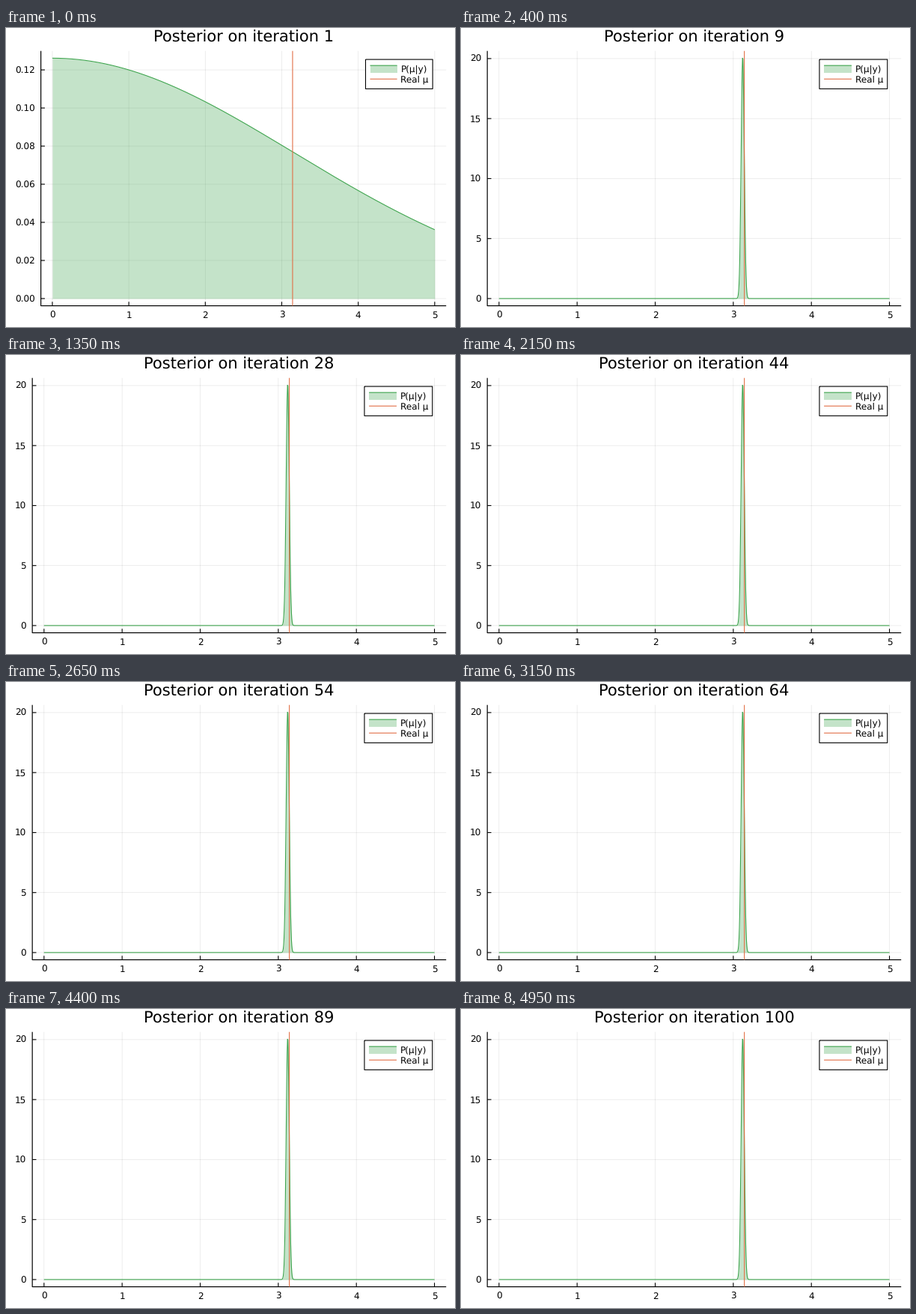
A matplotlib script for the animation above (5 s loop, 600 px wide and 400 px high).

```python
import math

import matplotlib.pyplot as plt
import numpy as np
from matplotlib.animation import FuncAnimation

W, H, DPI = 600, 400, 100
PX = 72 / DPI  # points per pixel
FRAMES, INTERVAL = 100, 50

GREEN, ORANGE = "#3da44d", "#e26f46"
TOP, BOTTOM, RIGHT = 30.7, 371.6, 588.2
PAD = 0.03 / 1.06  # axis margin on each side

REAL_MU = 3.1415
N, DATA_MEAN, DATA_VAR = 1000, 3.1205, 0.391
PRIOR_PRECISION = 0.1

plt.rcParams.update({"font.family": "DejaVu Sans", "text.hinting": "none"})


def posteriors(count):
    """Mean-field updates of the normal posterior over mu."""
    mean, var = 0.0, 1 / PRIOR_PRECISION
    result = []
    for _ in range(count):
        result.append((mean, var))
        tau = 1 / (DATA_VAR + (DATA_MEAN - mean) ** 2 + var)
        precision = PRIOR_PRECISION + N * tau
        mean, var = N * tau * DATA_MEAN / precision, 1 / precision
    return result


def tick_step(top):
    """Smallest 1-2-5 step that gives at most seven intervals."""
    base = 10 ** math.floor(math.log10(top / 7))
    return next(base * m for m in (1, 2, 5, 10) if top / (base * m) <= 7)


POSTERIORS = posteriors(FRAMES)
MU = np.linspace(0, 5, 1000)

fig = plt.figure(figsize=(W / DPI, H / DPI), dpi=DPI, facecolor="white")
ax = fig.add_axes([0, 0, 1, 1])


def line(x, y, color="black", width=1.1, z=2, **kw):
    ax.plot(x, y, color=color, lw=width * PX, zorder=z, snap=False,
            solid_capstyle="butt", **kw)


def text(x, y, label, size=12, ha="center", z=6):
    ax.text(x, y, label, fontsize=size * PX, ha=ha, va="baseline", zorder=z)


def fill(x, y0, y1, color, alpha=1.0, z=3):
    ax.fill_between(x, y0, y1, color=color, alpha=alpha, lw=0, zorder=z)


def draw_legend(width):
    unit = width / 45
    right = RIGHT - width / 30
    left = right - 4.5 * unit - 35.5
    top, row = TOP + (BOTTOM - TOP) / 30, 13.1
    bottom = top + 3 * row
    key = [left + unit / 2, left + 3.5 * unit]
    first, second = top + row, top + 2 * row

    fill([left, right], top, bottom, "white", z=5)
    line([left, right, right, left, left], [top, top, bottom, bottom, top], z=5.1)
    fill(key, first - 5, first + 5.1, GREEN, 0.3, z=5.2)
    line(key, [first - 5] * 2, GREEN, z=5.3)
    line(key, [second] * 2, ORANGE, z=5.3)
    label_x = left + 4 * unit - 1.2
    text(label_x, first + 4.4, "P(μ|y)", ha="left")
    text(label_x, second + 4.4, "Real μ", ha="left")


def draw(i):
    ax.clear()
    ax.set(xlim=(0, W), ylim=(H, 0))
    ax.axis("off")

    mean, var = POSTERIORS[i]
    density = np.exp(-(MU - mean) ** 2 / (2 * var)) / math.sqrt(2 * math.pi * var)
    peak = density.max()
    step = tick_step(peak * 1.03)
    decimals = max(0, -math.floor(math.log10(step) + 1e-9))
    ticks = [k * step for k in range(int(peak * 1.03 / step) + 1)]
    labels = [f"{t:.{decimals}f}" for t in ticks]

    # The left margin follows the widest tick label.
    em = max(sum(0.318 if c == "." else 0.636 for c in s) for s in labels)
    left = 19.9 + 12 * em
    width, height = RIGHT - left, BOTTOM - TOP

    def px(x):
        return left + width * (PAD + x / 5 / 1.06)

    def py(y):
        return BOTTOM - height * (PAD + y / peak / 1.06)

    for k in range(6):
        x = px(k)
        line([x, x], [TOP, BOTTOM], width=0.7, z=1, alpha=0.1)
        line([x, x], [BOTTOM, BOTTOM - 5.3])
        text(x, 387.6, str(k))
    for t, label in zip(ticks, labels):
        y = py(t)
        line([left, RIGHT], [y, y], width=0.7, z=1, alpha=0.1)
        line([left, left + 5.3], [y, y])
        text(left - 8, y + 4.4, label, ha="right")
    line([left, left, RIGHT], [TOP, BOTTOM, BOTTOM], width=1.2)

    fill(px(MU), py(0), py(density), GREEN, 0.3)
    line(px(MU), py(density), GREEN, z=3.5)
    line([px(REAL_MU)] * 2, [TOP, BOTTOM], ORANGE, z=4)

    draw_legend(width)
    text((left + RIGHT) / 2, 18.4, f"Posterior on iteration {i + 1}", size=21)
    return []


anim = FuncAnimation(fig, draw, frames=FRAMES, interval=INTERVAL,
                     init_func=lambda: [], repeat=True, repeat_delay=0)
plt.show()
```
